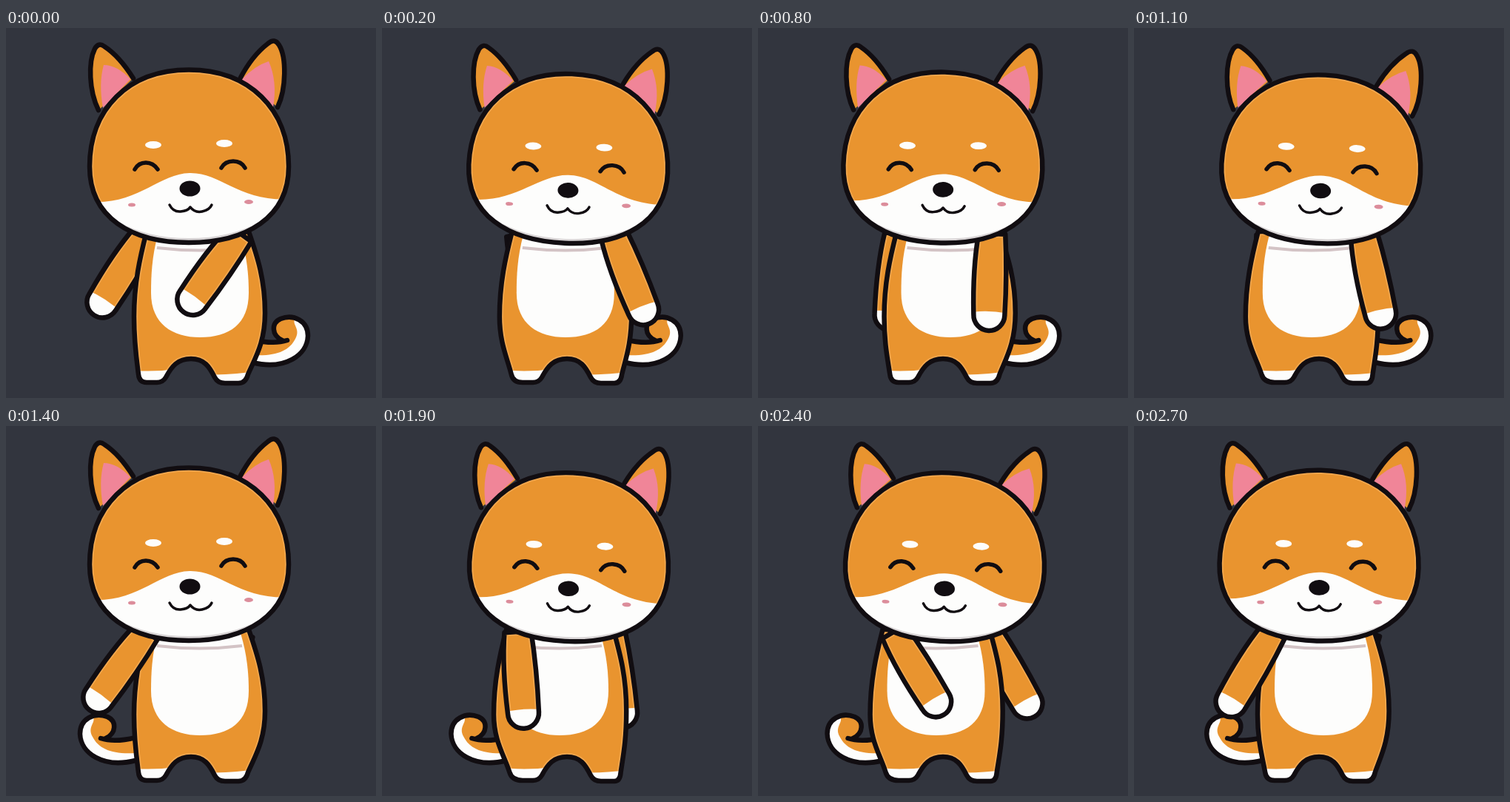
Animation of 500x500 px, one loop 2.8 s. Source, as an HTML page:

```html
<!DOCTYPE html>
<html lang="en">
<head>
<meta charset="utf-8">
<title>Dancing dog</title>
<style>
  html, body { margin: 0; width: 100%; height: 100%; overflow: hidden; background: #32353e; }
  svg { display: block; width: 100%; height: 100%; }
  .line { fill: none; stroke: #110d11; stroke-width: 6.5; stroke-linecap: round; stroke-linejoin: round; }
  .fur { fill: #e9942f; }
  .rim { fill: none; stroke: #f3a84e; stroke-width: 10; }
  .white { fill: #fdfdfc; }
  .pink { fill: #f08598; }
  .blush { fill: #dc8d9b; }
  .ink { fill: #110d11; }
</style>
</head>
<body>
<svg viewBox="0 0 500 500">
  <defs>
    <path id="skull" d="M247 56.500C329 56.500 382 110 382 187C382 256 325 290 247 290C169 290 113 256 113 187C113 110 165 56.500 247 56.500Z"/>
    <path id="ears" d="M125 111C112 85 111 46 120 28Q125 19 133 25Q153 38 172 68M367 107C379 82 379 39 369 23Q363 13 354 21Q333 37 317 67"/>
    <path id="limb" d="M-18 0C-23 35-23 75-21 110A21 21 0 0 0 21 110C22 70 21 35 18 0Z"/>
    <path id="torso"/>
    <clipPath id="inSkull"><use href="#skull"/></clipPath>
    <clipPath id="inLimb"><use href="#limb"/></clipPath>
    <clipPath id="inTorso"><use href="#torso"/></clipPath>
    <g id="arm">
      <use href="#limb" class="fur"/>
      <g clip-path="url(#inLimb)">
        <use href="#limb" class="rim"/>
        <path class="white" d="M-30 108Q0 102 30 108V140H-30Z"/>
      </g>
      <use href="#limb" class="line"/>
    </g>
  </defs>

  <g id="tail">
    <path class="white" d="M330 421C346 425 360 426 370 422C356 415 355 399 368 393C386 386 405 396 405 416C404 442 374 463 330 452Z"/>
    <path class="fur" d="M330 421C346 425 360 426 370 422C356 415 355 399 368 393Q378 389 388 393C382 400 396 406 388 420C380 436 362 444 330 442Z"/>
    <path class="line" d="M330 421C346 425 362 427 377 422M370 422C356 415 355 399 368 393C386 386 405 396 405 416C404 442 374 463 330 452"/>
  </g>
  <use id="backArm" href="#arm"/>

  <use href="#torso" class="fur"/>
  <g clip-path="url(#inTorso)">
    <use href="#torso" class="rim"/>
    <path class="white" d="M150 461Q195 466 228 461V490H150ZM268 468Q300 470 345 463V490H268Z"/>
    <g id="belly">
      <path class="white" d="M195 280C187 310 186 335 186 358C186 400 215 418 252 418C292 418 318 400 318 358C318 335 316 310 307 280Z"/>
      <path d="M194 297Q252 304 309 297" fill="none" stroke="#d3c3c5" stroke-width="4"/>
    </g>
  </g>
  <use href="#torso" class="line"/>
  <use id="frontArm" href="#arm"/>

  <g id="head">
    <use href="#ears" class="fur"/>
    <path class="pink" d="M132 50Q150 50 168 69L131 108Q125 75 132 50ZM355 45Q336 51 318 70L361 107Q367 72 355 45Z"/>
    <use href="#ears" class="line"/>
    <use href="#skull" class="fur"/>
    <g clip-path="url(#inSkull)">
      <use href="#skull" class="rim"/>
      <path class="white" d="M105 234C175 243 205 197 248 196C292 195 315 237 390 231V300H105Z"/>
      <path d="M150 264Q190 287 247 287T345 264" fill="none" stroke="#d9d5d6" stroke-width="6"/>
    </g>
    <use href="#skull" class="line"/>
    <g class="white">
      <ellipse cx="199" cy="158" rx="11" ry="5"/>
      <ellipse cx="295" cy="156" rx="11" ry="5"/>
    </g>
    <path class="line" style="stroke-width:5.5" d="M174 191Q179 182 189 182T205 191M291 189Q296 180 307 180T323 189"/>
    <ellipse class="ink" cx="248.500" cy="217" rx="14" ry="10.500"/>
    <path class="line" style="stroke-width:3.5" d="M221 239Q226 249 236 248T249 242Q255 250 265 248T278 239"/>
    <ellipse class="blush" cx="170" cy="239" rx="5" ry="2.500"/>
    <ellipse class="blush" cx="328" cy="235" rx="6" ry="3"/>
  </g>
</svg>
<script>
const el = id => document.getElementById(id);
const place = (id, transform) => el(id).setAttribute('transform', transform);

// Cyclic poses: [phase, hip shift in px, arm angle in degrees]
const poses = [
  [0, 10, 36], [.143, 7.5, 2], [.27, -3, -20], [.385, -11.5, -31], [.5, -12.5, -25],
  [.615, -12, -4], [.714, -8, 6], [.846, 4, 31], [1, 10, 36]
];

function poseAt(phase) {
  const i = poses.findIndex(p => p[0] > phase);
  const a = poses[i - 1], b = poses[i];
  const k = (phase - a[0]) / (b[0] - a[0]);
  return [1, 2].map(j => a[j] + (b[j] - a[j]) * k);
}

function torsoPath(b) {
  const x = (base, weight) => base + b * weight;
  return `M${x(180, 1)} 275C${x(171, 1)} 310 ${x(163, 1)} 345 ${x(163, 1)} 390
    C${x(163, 1)} 425 ${x(171, .5)} 445 ${x(176, .3)} 468
    Q${x(178, .2)} 479 190 479H204Q212 479 216 472
    C224 457 232 447 250 447C268 447 275 458 282 472Q286 480 296 480H314Q${x(323, .1)} 480 ${x(325, .2)} 468
    C${x(332, .5)} 445 ${x(341, .9)} 425 ${x(341, .9)} 385
    C${x(341, .9)} 340 ${x(332, .8)} 310 ${x(321, .7)} 275Z`;
}

function draw(now) {
  const tick = Math.floor(now / 100) % 28;
  const mirrored = tick >= 14;
  // Two sways per half; the second half holds its first pose for two ticks
  const phase = (mirrored ? Math.max(0, tick - 15) / 6.5 : tick / 7) % 1;
  const [hip, angle] = poseAt(phase);
  const tilt = Math.abs(Math.sin(Math.PI * phase)) * 1.03;
  const shoulders = [187 + hip * .3, 314 + hip * .3];
  const [back, front] = mirrored ? shoulders.reverse() : shoulders;
  const backAngle = angle * .8 + (mirrored ? -4 : 4);

  el('torso').setAttribute('d', torsoPath(hip));
  place('belly', `translate(${hip})`);
  place('backArm', `translate(${back} 278) rotate(${backAngle})`);
  place('frontArm', `translate(${front} 278) rotate(${angle})`);
  place('tail', `translate(${hip * .3})` + (mirrored ? ' translate(502) scale(-1 1)' : ''));
  place('head', `translate(247 ${288 + tilt}) rotate(${3 * tilt}) scale(1 ${1 - .025 * tilt}) translate(-247 -288)`);
}

const start = performance.now();
function loop() {
  draw(performance.now() - start);
  requestAnimationFrame(loop);
}
loop();
</script>
</body>
</html>
```
